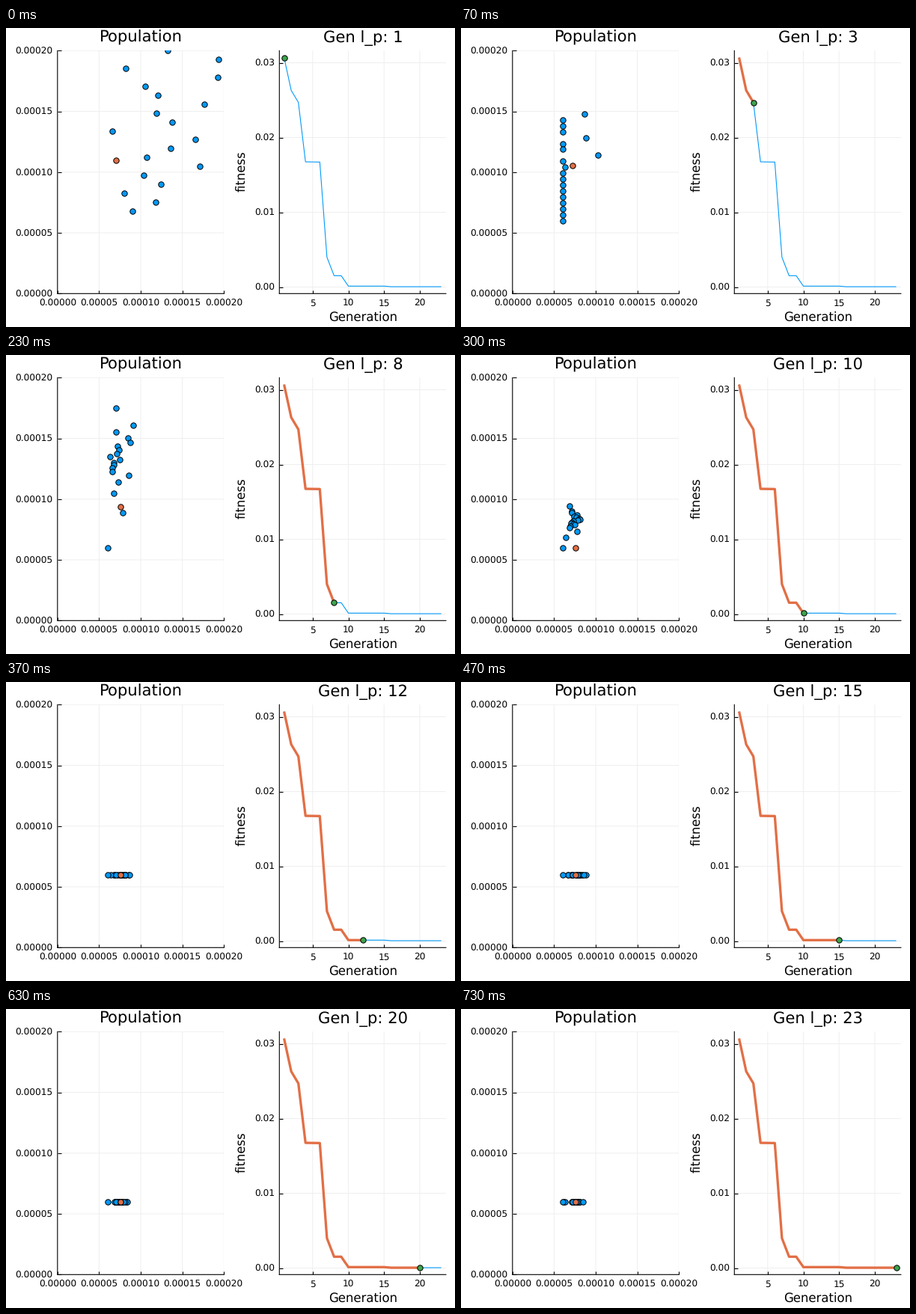
Animation of 600x400 px, one loop 760 ms. Source, as a matplotlib script:

```python
import numpy as np
import matplotlib.pyplot as plt
from matplotlib.animation import FuncAnimation

W, H = 600, 400
PX = 0.72  # points per pixel at 100 dpi
BLUE, ORANGE, GREEN = "#009af9", "#e26f46", "#3da44d"
LAST_GEN, SIZE = 23, 19
LOW = 60  # lower bound of both parameters, in millionths
LOOP, STEP = 760, 10

plt.rcParams.update({
    "font.family": "DejaVu Sans",
    "text.hinting": "no_hinting",
    "lines.solid_capstyle": "butt",
})

gens = np.arange(1, LAST_GEN + 1)
starts = np.round((gens - 1) * 10 / 3) * 10
fitness = np.interp(
    gens,
    [1, 2, 3, 4, 6, 7, 8, 9, 10, 15, 16],
    [0.0307, 0.0263, 0.0247, 0.01675, 0.01672, 0.004, 0.00152, 0.00152,
     0.00013, 0.00013, 0.00005])


def population(gen):
    """Random start, collapse onto the x bound, a loose cloud, then a flat row."""
    rng = np.random.default_rng(gen)
    t = np.linspace(0, 1, SIZE)
    if gen == 1:
        return rng.uniform(62, 200, SIZE), 200 - 132 * t
    if gen <= 3:
        stray = rng.random(SIZE) < 0.25
        return np.where(stray, rng.uniform(LOW, 150, SIZE), LOW), 148 - 88 * t
    if gen < 10:
        x = rng.uniform(LOW, 91, SIZE)
    else:
        x = np.maximum(rng.normal(75.5, 6, SIZE), LOW)
    x[-1] = LOW
    height = np.interp(gen, [9, 10, 11, 12], [1, 0.3, 0.1, 0])
    return x, LOW + height * (115 - 60 * np.sqrt(t) - 55 * t**12)


def best(gen):
    return (np.interp(gen, [1, 8], [70, 76]),
            np.interp(gen, [1, 8, 9, 10], [110, 94, 94, LOW]))


def panel(left, right, xlim, ylim, xticks, yticks, xnames, ynames):
    top, bottom = 30.3, 355.3
    ax = fig.add_axes([left / W, 1 - bottom / H, (right - left) / W, (bottom - top) / H])
    ax.set(xlim=xlim, ylim=ylim)
    ax.set_xticks(xticks, xnames)
    ax.set_yticks(yticks, ynames)
    ax.spines[["top", "right"]].set_visible(False)
    for side in ("left", "bottom"):
        ax.spines[side].set(linewidth=1.1 * PX, snap=False)
    ax.tick_params(direction="in", length=4.5 * PX, width=1.1 * PX, labelsize=12.1 * PX)
    ax.tick_params(axis="x", pad=7.8 * PX)
    ax.tick_params(axis="y", pad=6.3 * PX)
    ax.set_axisbelow(True)
    ax.grid(color="#efefef", linewidth=PX, snap=False)
    return ax


def label(x, y, text, size, **kw):
    return fig.text(x / W, 1 - y / H, text, size=size * PX, ha="center",
                    va="baseline", rotation_mode="anchor", **kw)


def dots(ax, color, z):
    return ax.plot([], [], "o", color=color, ms=7.4 * PX, mec="black",
                   mew=PX, zorder=z)[0]


fig = plt.figure(figsize=(W / 100, H / 100), dpi=100, facecolor="white")

ticks = np.arange(0, 201, 50)
names = [f"{v * 1e-6:.5f}" for v in ticks]
pop_ax = panel(68.8, 291.3, (0, 200), (0, 200), ticks, ticks, names, names)

xticks, yticks = np.arange(5, 21, 5), np.arange(4) / 100
fit_ax = panel(365.3, 587.9, (0.34, 23.66), (-0.00087, 0.03162), xticks, yticks,
               xticks, [f"{v:.2f}" for v in yticks])

label(180.8, 19, "Population", 21.1)
title = label(477, 19, "", 21.1)
label(477, 393, "Generation", 16.5)
label(320.6, 192, "fitness", 16.5, rotation=90)

fit_ax.plot(gens, fitness, color=BLUE, lw=1.1 * PX, zorder=3)
trail, = fit_ax.plot([], [], color=ORANGE, lw=3.3 * PX, zorder=4)
head = dots(fit_ax, GREEN, 5)
crowd = dots(pop_ax, BLUE, 3)
leader = dots(pop_ax, ORANGE, 4)


def draw(i):
    gen = int(np.searchsorted(starts, i * STEP, side="right"))
    title.set_text(f"Gen l_p: {gen}")
    crowd.set_data(*population(gen))
    x, y = best(gen)
    leader.set_data([x], [y])
    trail.set_data(gens[:gen], fitness[:gen])
    head.set_data([gen], [fitness[gen - 1]])
    return title, crowd, leader, trail, head


anim = FuncAnimation(fig, draw, frames=LOOP // STEP, interval=STEP,
                     repeat=True, repeat_delay=0)
plt.show()
```
